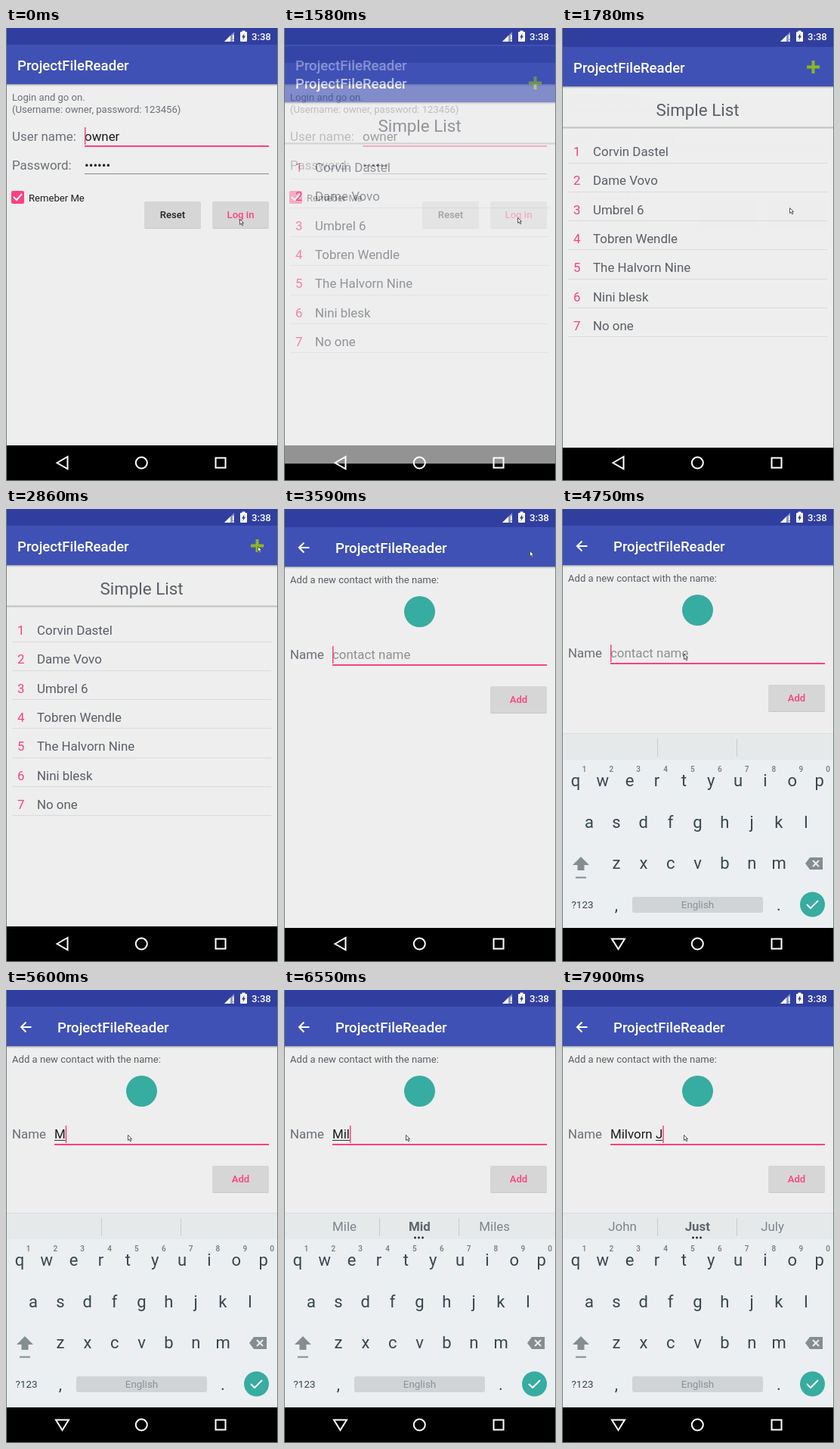
Write an HTML page with a canvas that moves like this. It is 360 px wide and 598 px high and loops after 8 s.

```html
<!DOCTYPE html>
<html lang="en">
<head>
<meta charset="utf-8">
<style>
html, body { margin: 0; width: 360px; height: 598px; overflow: hidden; background: #000; }
canvas { display: block; }
</style>
</head>
<body>
<canvas id="stage" width="360" height="598"></canvas>
<script>
const LOOP = 8000, W = 360, H = 598, NAV = 551;
const PINK = '#ff4081', TEAL = '#37aca0', GREY = '#6b6f76', SLATE = '#5a5e66', INK = '#37474f', EDGE = '#6a807c';
const screen = document.getElementById('stage').getContext('2d');
const layer = Object.assign(document.createElement('canvas'), { width: W, height: H }).getContext('2d');
let g = screen;

const clamp = v => Math.max(0, Math.min(1, v));
// Latest entry whose start time has passed
const latest = (list, t) => list.filter(e => e[0] <= t).pop();

function rect(x, y, w, h, color, r = 0) {
  g.fillStyle = color;
  g.beginPath();
  g.roundRect(x, y, w, h, r);
  g.fill();
}
function disc(x, y, r, color) {
  g.fillStyle = color;
  g.beginPath();
  g.arc(x, y, r, 0, 7);
  g.fill();
}
function poly(points, { fill, stroke, width = 2, close = true }) {
  g.beginPath();
  points.forEach(([x, y]) => g.lineTo(x, y));
  if (close) g.closePath();
  if (fill) { g.fillStyle = fill; g.fill(); }
  if (stroke) { g.strokeStyle = stroke; g.lineWidth = width; g.stroke(); }
}
function text(s, x, y, size, color, weight = 400, align = 'left') {
  g.font = `${weight} ${size}px Roboto, sans-serif`;
  g.textAlign = align;
  g.fillStyle = color;
  g.fillText(s, x, y);
}
function button(label, x, y, color) {
  rect(x, y + 1, 75, 35, '#c8c8c8', 2);
  rect(x, y, 75, 35, '#d6d6d6', 2);
  text(label, x + 37.5, y + 22, 13.1, color, 500, 'center');
}

function frame(titleX) {
  rect(0, 0, W, H, '#000');
  rect(0, 0, W, NAV, '#eeeeee');
  [[74, '#a9aab0'], [75, '#cfcfd2'], [76, '#e2e2e3']].forEach(([y, c]) => rect(0, y, W, 1, c));
  rect(0, 22, W, 52, '#3f51b5');
  rect(0, 0, W, 22, '#303f9f');
  text('ProjectFileReader', titleX, 56, 18.6, '#fff', 500);
}

function loginPage(t) {
  frame(15);
  text('Login and go on.', 8, 96, 13.1, GREY);
  text('(Username: owner, password: 123456)', 8, 111.5, 13.1, GREY);
  text('User name:', 8, 149, 16.9, GREY);
  text('owner', 104, 149, 16.9, '#1c1c1c');
  rect(104, 155, 244, 2, PINK);
  if (t < 50) rect(104, 131, 1.5, 23, PINK);
  text('Password:', 8, 186.5, 16.9, GREY);
  text('••••••', 104, 186.5, 16.9, '#1c1c1c');
  rect(104, 192, 244, 1, '#8a8a8a');
  rect(7, 215, 17, 17, PINK, 2);
  poly([[10, 223], [14, 227], [21, 219]], { stroke: '#fff', close: false });
  text('Remeber Me', 30, 228.5, 13.1, '#1c1c1c');
  button('Reset', 183, 229, '#222');
  button('Log in', 273, 229, PINK);
}

const people = ['Corvin Dastel', 'Dame Vovo', 'Umbrel 6', 'Tobren Wendle', 'The Halvorn Nine', 'Nini blesk', 'No one'];

function listPage() {
  frame(15);
  rect(324, 46.5, 17, 4, '#8cb81f');
  rect(330.5, 40, 4, 17, '#8cb81f');
  text('Simple List', 179.5, 113, 22.4, SLATE, 400, 'center');
  rect(0, 127.5, W, 2, '#c2c2c4');
  people.forEach((name, i) => {
    const y = 166 + i * 38.3;
    text(i + 1, 15, y, 16.9, PINK);
    text(name, 41, y, 16.9, SLATE);
    rect(8, Math.round(y + 8.5), 343, 1, '#dadadb');
  });
}

const typed = [
  [0, ''], [5600, 'M'], [6180, 'Mi'], [6550, 'Mil'], [6980, 'Milv'], [7100, 'Milvo'],
  [7220, 'Milvor'], [7370, 'Milvorn'], [7550, 'Milvorn '], [7780, 'Milvorn J']
];
const suggestions = [
  [0], [5720, 'Most', 'My', 'Make'], [6270, 'Mile', 'Mid', 'Miles'], [6670, 'Milder', 'Mild', 'Milking'],
  [6980, 'Milder', 'Milk', 'Milking'], [7420, '', 'Milvorn', ''], [7590, 'is the', 'and', 'of the'],
  [7880, 'John', 'Just', 'July']
];

function addPage(t) {
  frame(68);
  poly([[33.5, 49], [20, 49]], { stroke: '#fff' });
  poly([[26.5, 42.5], [20, 49], [26.5, 55.5]], { stroke: '#fff', close: false });
  text('Add a new contact with the name:', 8, 96, 13.1, SLATE);
  disc(179.5, 133.5, 20.5, TEAL);
  text('Name', 8, 196, 16.9, GREY);
  const value = latest(typed, t)[1];
  text(value || 'contact name', 64, 196, 16.9, value ? '#1c1c1c' : '#8f8f92');
  const end = 64 + (value ? g.measureText(value).width : 0);
  const start = 64 + g.measureText(value.slice(0, value.lastIndexOf(' ') + 1)).width;
  if (value) rect(start, 198, end - start, 1, '#333');
  rect(64, 203, 284, 2, PINK);
  if (t < 5290 || t >= 5600) rect(end, 179, 1.5, 23, PINK);
  button('Add', 273, 232, PINK);
}

function keyboard(t) {
  rect(0, 294, W, NAV - 294, '#ebeff1');
  rect(0, 294, W, 35, '#e6e9ea');
  rect(0, 294, W, 1, '#d9dcde');
  rect(126, 301, 1, 24, '#c6cbce');
  rect(231, 301, 1, 24, '#c6cbce');
  const words = latest(suggestions, t).slice(1);
  words.forEach((word, i) =>
    text(word, 80 + i * 99.3, 318, 16.9, i === 1 ? '#5b666c' : '#7b868b', i === 1 ? 700 : 400, 'center'));
  if (words.length) [173.5, 178.5, 183.5].forEach(x => disc(x, 327, 1.4, '#222'));

  [['qwertyuiop', 18, 364], ['asdfghjkl', 36, 418.5], ['zxcvbnm', 72, 473]].forEach(([keys, x, y]) =>
    [...keys].forEach((key, i) => text(key, x + i * 35.85, y, 22, INK, 400, 'center')));
  [...'1234567890'].forEach((n, i) => text(n, 29.5 + i * 35.85, 345, 10, '#6f7b80', 500, 'center'));

  poly([[25, 457], [36, 468], [29.5, 468], [29.5, 475], [20.5, 475], [20.5, 468], [14, 468]], { fill: '#848d90' });
  rect(18, 483.5, 14, 2, '#848d90');
  poly([[322, 466], [328, 458], [345, 458], [345, 474], [328, 474]], { fill: '#848d90' });
  poly([[332, 462], [340, 470]], { stroke: '#ebeff1' });
  poly([[340, 462], [332, 470]], { stroke: '#ebeff1' });

  text('?123', 27, 525, 13.5, INK, 400, 'center');
  text(',', 72, 528, 22, INK, 400, 'center');
  rect(93, 510, 173, 21, '#d0d4d6', 3);
  text('English', 179.5, 525, 13.4, '#899296', 400, 'center');
  text('.', 287, 528, 22, INK, 400, 'center');
  disc(331.5, 520, 16.5, TEAL);
  poly([[324, 520], [329, 525], [339, 515]], { stroke: '#fff', close: false });
}

function systemBars(t) {
  poly([[289, 18], [302, 5], [302, 18]], { fill: '#8d96cc' });
  poly([[289, 18], [297, 10], [297, 18]], { fill: '#fff' });
  rect(300, 9, 1.5, 6, '#fff');
  rect(300, 16, 1.5, 2, '#fff');
  rect(310, 5, 9, 13, '#fff', 1);
  rect(312.5, 3.5, 4, 2, '#fff');
  poly([[315.5, 7], [312, 12.5], [314, 12.5], [313.5, 16], [317, 10.5], [315, 10.5]], { fill: '#303f9f' });
  text('3:38', 325, 16, 13.1, '#fff', 500);

  const back = t < 4510 ? [[67.5, 574], [81.5, 566], [81.5, 582]] : [[66, 567.5], [83, 567.5], [74.5, 581]];
  poly(back, { stroke: '#fff' });
  g.beginPath();
  g.arc(179.3, 574, 7.5, 0, 7);
  g.stroke();
  g.strokeRect(277.5, 567.5, 13, 13);
  rect(0, 0, 1, H, EDGE);
  rect(W - 1, 0, 1, H, EDGE);
  rect(0, H - 1, W, 1, EDGE);
}

const pointerPath = [
  [0, 309, 252], [1650, 309, 250], [2240, 245, 147], [2290, 245, 147], [2860, 333, 49], [3300, 333, 49],
  [3500, 325, 55], [3620, 325, 55], [3980, 230, 184], [4150, 230, 184], [4480, 161, 191], [LOOP, 161, 191]
];

function pointer(t) {
  const i = pointerPath.findIndex(p => p[0] > t);
  const [t0, x0, y0] = pointerPath[i - 1], [t1, x1, y1] = pointerPath[i];
  const p = (t - t0) / (t1 - t0), k = p * p * (3 - 2 * p);
  const x = Math.round(x0 + (x1 - x0) * k) + .5, y = Math.round(y0 + (y1 - y0) * k) + .5;
  const shape = [[0, 0], [0, 7], [1.7, 5.6], [3, 8.3], [4.2, 7.8], [3, 5.1], [5, 5]];
  poly(shape.map(([dx, dy]) => [x + dx, y + dy]), { fill: '#fff', stroke: '#555', width: 1 });
}

// Draws a window that rises by `rise` pixels while it fades in
function enter(draw, t, start, duration, rise) {
  const p = clamp((t - start) / duration);
  if (!p) return;
  g = layer;
  g.clearRect(0, 0, W, H);
  draw(t);
  g = screen;
  g.globalAlpha = 1 - (1 - clamp(p * 1.65)) ** 4;
  g.drawImage(layer.canvas, 0, Math.round(rise * (1 - p) ** 5));
  g.globalAlpha = 1;
}

function render(now) {
  const t = now % LOOP;
  loginPage(t);
  enter(listPage, t, 1490, 700, 48);
  enter(addPage, t, 3250, 700, 48);
  enter(keyboard, t, 4510, 500, 50);
  systemBars(t);
  pointer(t);
  requestAnimationFrame(render);
}
requestAnimationFrame(render);
</script>
</body>
</html>
```
